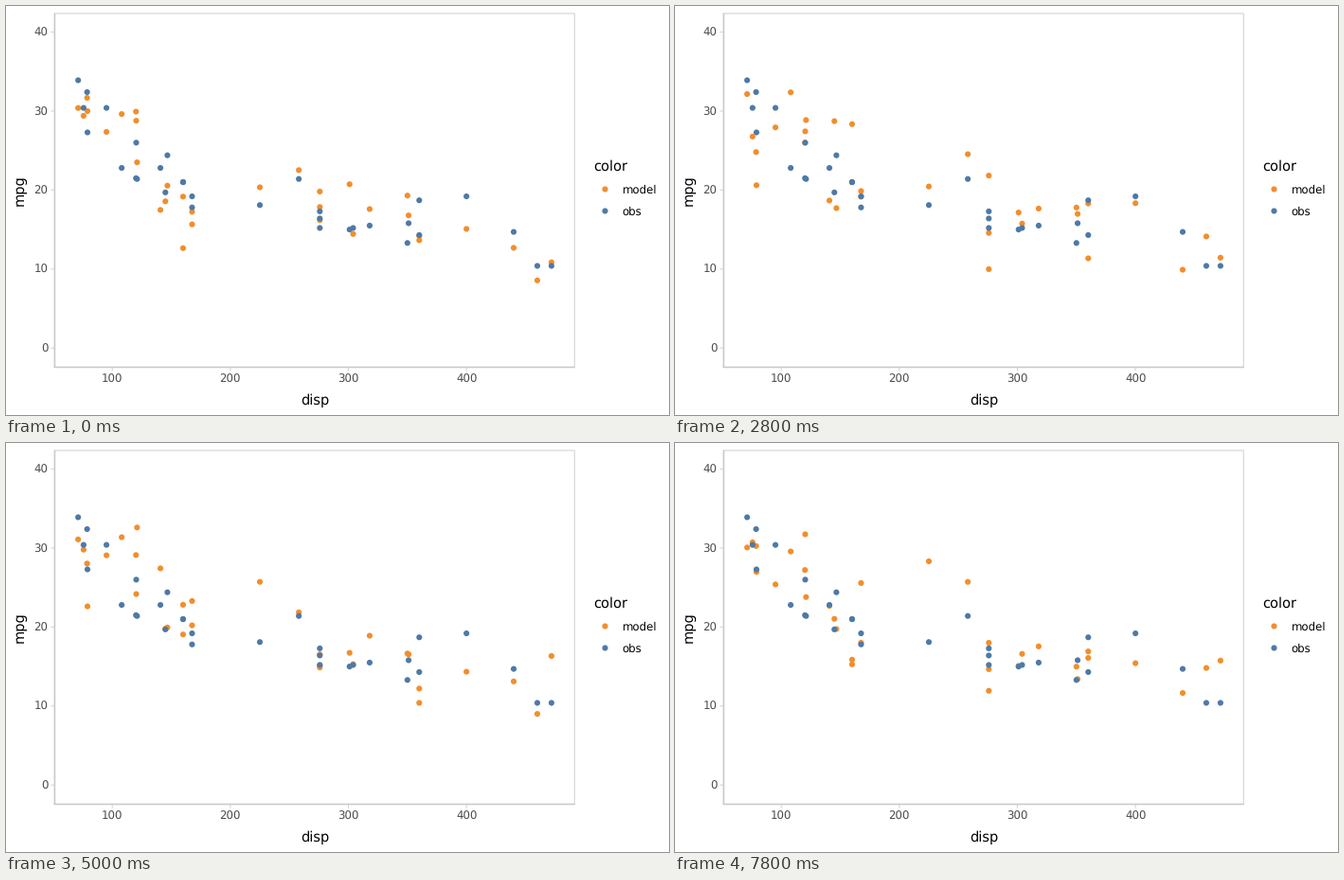
Recreate the animation shown at these times as a matplotlib script. Size 700 by 432 pixels, loop 8000 ms.

```python
import numpy as np
import matplotlib.pyplot as plt
from matplotlib.animation import FuncAnimation
from matplotlib.patches import Rectangle

plt.rcParams["text.hinting"] = "none"

W, H, DPI = 700, 432, 100
STEPS, STEP_MS = 40, 200
PT = 72 / DPI  # points per pixel
ORANGE, BLUE = "#f28e2b", "#4e79a7"
BORDER, AXIS, TICK_TEXT = "#d3d3d3", "#c9c9c9", "#4d4d4d"
SMALL, LARGE = 11.73, 14.67
DOT = 6.15
NOISE = 3.1

# mtcars: displacement and miles per gallon
disp = np.array([
    71.1, 75.7, 78.7, 79, 95.1, 108, 120.1, 120.3, 121, 140.8, 145, 146.7,
    160, 160, 167.6, 167.6, 225, 258, 275.8, 275.8, 275.8, 301, 304, 318,
    350, 351, 360, 360, 400, 440, 460, 472])
mpg = np.array([
    33.9, 30.4, 32.4, 27.3, 30.4, 22.8, 21.5, 26, 21.4, 22.8, 19.7, 24.4,
    21, 21, 19.2, 17.8, 18.1, 21.4, 16.4, 17.3, 15.2, 15, 15.2, 15.5,
    13.3, 15.8, 18.7, 14.3, 19.2, 14.7, 10.4, 10.4])

# centre of the model's predictions
trend = np.interp(disp, [71, 108, 145, 168, 258, 276, 400, 440, 472],
                  [30, 28.5, 20.5, 19.5, 23.5, 16.5, 16.5, 12, 11.5])


def predict(step):
    """One independent predictive draw per step."""
    rng = np.random.default_rng(step)
    return np.clip(trend + rng.normal(0, NOISE, disp.size), 3, 40.4)


def px(d):
    return 76.15 + (d - 71.1) * 1.2466


def py(m):
    return 361.25 - m * 8.343


fig = plt.figure(figsize=(W / DPI, H / DPI), dpi=DPI, facecolor="white")
ax = fig.add_axes([0, 0, 1, 1])
ax.set_xlim(0, W)
ax.set_ylim(H, 0)
ax.axis("off")


def label(x, y, s, size=SMALL, color="black", ha="left", rotation=0):
    ax.text(x, y, s, fontsize=size * PT, color=color, family="DejaVu Sans",
            ha=ha, va="baseline", rotation=rotation, rotation_mode="anchor")


def line(xs, ys, width=1.07, color=BORDER):
    ax.plot(xs, ys, color=color, lw=width * PT, snap=False,
            solid_capstyle="butt")


def dots(x, y, color):
    # one size per dot keeps sub-pixel positions
    sizes = np.full(len(x), (DOT * PT) ** 2)
    return ax.scatter(x, y, s=sizes, c=color, linewidths=0, zorder=3)


# panel and axes
ax.add_patch(Rectangle((51.7, 7.9), 548.6, 373.4, fill=False, ec=BORDER,
                       lw=1.07 * PT, snap=False))
line([51.3, 51.3], [7.4, 382], 1.42, AXIS)
line([50.6, 600.8], [381.6, 381.6], 1.42, AXIS)

for d in range(100, 500, 100):
    line([px(d)] * 2, [382, 385.5])
    label(px(d), 397.6, str(d), color=TICK_TEXT, ha="center")
for m in range(0, 50, 10):
    line([47.5, 51], [py(m)] * 2)
    label(44.5, py(m) + 4.5, str(m), color=TICK_TEXT, ha="right")

label(326, 420.8, "disp", LARGE, ha="center")
label(18.2, 194.2, "mpg", LARGE, ha="center", rotation=90)

# legend
label(620.6, 173.3, "color", LARGE)
for y, name, color in ((193.2, "model", ORANGE), (216.2, "obs", BLUE)):
    dots([632.1], [y], color)
    label(650.6, y + 4.2, name)

model = dots(px(disp), py(predict(0)), ORANGE)
dots(px(disp), py(mpg), BLUE)


def update(step):
    model.set_offsets(np.column_stack([px(disp), py(predict(step))]))
    return [model]


anim = FuncAnimation(fig, update, frames=STEPS, interval=STEP_MS, repeat=True,
                     repeat_delay=0, blit=False)
plt.show()
```
